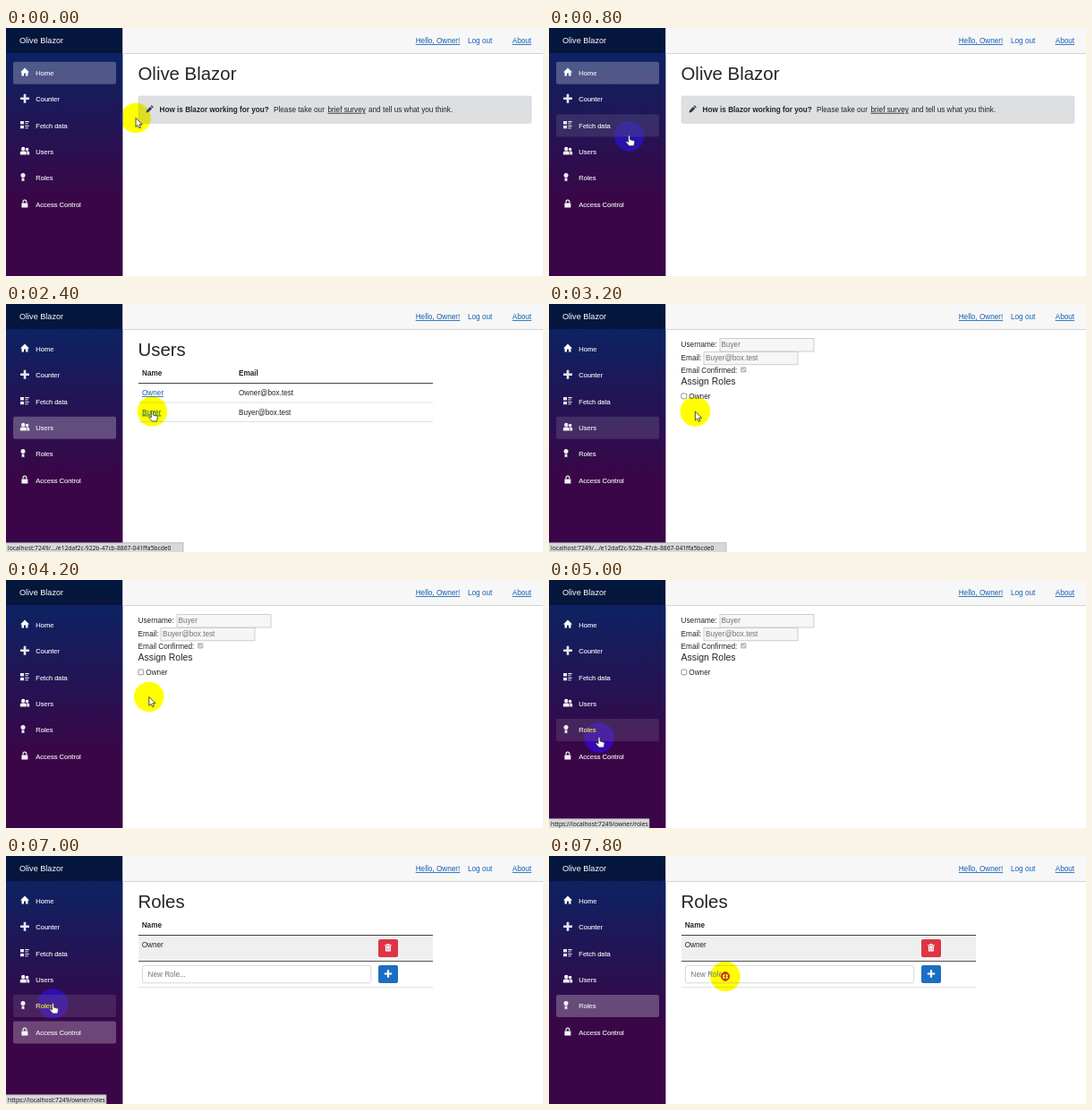
An HTML page for the animation above (8 s loop, 600x277 px).

```html
<!DOCTYPE html>
<html lang="en">
<head>
<meta charset="utf-8">
<title>Olive Blazor</title>
<style>
  html, body { margin: 0; width: 100%; height: 100%; overflow: hidden; background: #fff; }
  svg { display: block; width: 100%; height: 100%; }
  text { font: 8.2px "Liberation Sans", Arial, sans-serif; fill: #212529; white-space: pre; }
  .b { font-weight: bold; }
  .h1 { font-size: 20.4px; }
  .h2 { font-size: 10.45px; }
  .nav { font-size: 7.5px; fill: #eeeef3; stroke: #eeeef3; stroke-width: .15px; }
  .brand { font-size: 9.1px; fill: #fff; }
  .link { fill: #1261b5; }
  .u { text-decoration: underline; }
  .gray { fill: #6c757d; }
  .white { fill: #fff; }
  #status text { font: 6.75px "Open Sans", "Noto Sans", sans-serif; fill: #111; }
  #halo { fill: #00f; mix-blend-mode: difference; }
</style>
</head>
<body>
<svg id="stage" viewBox="0 0 600 277"></svg>
<script>
const LOOP = 8000, TICK = 200;
const HOST = 'https://localhost:7249/owner/';

const text = (x, y, s, cls = '') => `<text x="${x}" y="${y}" class="${cls}">${s}</text>`;
const rect = (x, y, w, h, fill, more = '') =>
  `<rect x="${x}" y="${y}" width="${w}" height="${h}" fill="${fill}" ${more}/>`;
const line = (x1, x2, y, color) => rect(x1, y, x2 - x1, 1, color);
const path = (d, fill, more = '') => `<path d="${d}" fill="${fill}" ${more}/>`;
const group = (id, body) => `<g id="${id}">${body}</g>`;
const plus = (x, y, r) =>
  path(`M${x - r} ${y}h${2 * r}M${x} ${y - r}v${2 * r}`, 'none', 'stroke="#fff" stroke-width="2.2"');

function checkbox(x, y, checked, fill = '#6f6f6f') {
  return checked
    ? rect(x, y, 6.4, 6.4, fill, 'rx="1"') +
      path(`M${x + 1.4} ${y + 3.2}l1.4 1.5l2.4 -3`, 'none', 'stroke="#fff" stroke-width="1"')
    : rect(x + .4, y + .4, 5.8, 5.8, '#fff', 'rx="1" stroke="#767676" stroke-width=".8"');
}

// Icons are centred on 0,0
const icons = [
  path('M0 -5L-5 0h1.5v4h2.5v-3h2v3h2.5v-4h1.5z', '#fff'),
  path('M-1.3 -5h2.6v3.7h3.7v2.6h-3.7v3.7h-2.6v-3.7h-3.7v-2.6h3.7z', '#e8e8ee'),
  path('M-5 -4h4v3.4h-4zM-5 .8h4v3.4h-4zM.3 -4h4.4v1.2h-4.4zM.3 -1.7h3.4v1.1h-3.4zM.3 .8h4.4v1.2h-4.4zM.3 3.1h3.4v1.1h-3.4z', '#e8e8ee'),
  '<g fill="#f2f2f6"><circle cx="-1.8" cy="-2.4" r="2.2"/><circle cx="2.6" cy="-2" r="1.8"/>' +
    '<path d="M-5.2 4v-2q0 -2 2 -2h3q2 0 2 2v2zM2.4 4v-2.5l-.6 -1.5h1.6q1.8 0 1.8 2v2z"/></g>',
  '<g fill="#f2f2f6"><circle cx="-2" cy="-2.3" r="2.5"/><path d="M-3.4 .8h2.8v4l-1.4 -1l-1.4 1z"/></g>',
  path('M-3.6 -.6h7v5h-7z', '#f2f2f6') +
    path('M-2 -.6v-1.6a1.9 1.9 0 0 1 3.8 0v1.6', 'none', 'stroke="#f2f2f6" stroke-width="1.2"'),
];
const navNames = ['Home', 'Counter', 'Fetch data', 'Users', 'Roles', 'Access Control'];
const navY = i => 50.2 + 29.35 * i;

const sidebar =
  rect(0, 0, 130.4, 277, 'url(#side)') + rect(0, 0, 130.4, 28, '#000', 'opacity=".4"') +
  text(15, 17.3, 'Olive Blazor', 'brand') +
  navNames.map((name, i) =>
    rect(8, navY(i) - 12.5, 115, 25, '#fff', `rx="2" class="item" opacity="0"`) +
    `<g transform="translate(21 ${navY(i) - .8})">${icons[i]}</g>` +
    text(33.3, navY(i) + 2.8, name, 'nav')).join('');

const topbar = rect(130.4, 0, 469.6, 28, '#f7f7f7') + line(130.4, 600, 28, '#d6d5d5') +
  group('account', text(457.7, 17, 'Hello, Owner!', 'link u') +
    text(516, 17, 'Log out', 'link') + text(565.7, 17, 'About', 'link u'));

const home = text(147.5, 57.5, 'Olive Blazor', 'h1') +
  rect(148, 76, 439, 30.5, '#dddfe1', 'rx="2" stroke="#d0d3d6" stroke-width=".6"') +
  path('M156.500 94.500l.6 -2.600l4 -4l2.100 2.100l-4 4zM161.700 87.300l1 -1l2.100 2.100l-1 1z', '#333a40') +
  text(171.5, 93.8, 'How is Blazor working for you?', 'b') +
  text(299, 93.8, 'Please take our') + text(359.5, 93.8, 'brief survey', 'u') +
  text(405, 93.8, 'and tell us what you think.');

const users = text(147.5, 57.5, 'Users', 'h1') +
  text(152, 80, 'Name', 'b') + text(260, 80, 'Email', 'b') + line(148, 477, 88, '#444') +
  ['Owner', 'Buyer'].map((name, i) =>
    text(152, 102 + 21.5 * i, name, 'link u') +
    text(260, 102 + 21.5 * i, name + '@box.test') +
    line(148, 477, 109.5 + 21.5 * i, '#dee2e6')).join('');

const field = (x, y) => rect(x, y, 105, 14.4, '#f6f6f6', 'stroke="#c4c4c4" stroke-width=".8"');
const detail = text(147.6, 48.3, 'Username:') + field(191, 38.6) + text(192.5, 48.3, 'Buyer', 'gray') +
  text(147.6, 63, 'Email:') + field(173, 53.4) + text(175, 63, 'Buyer@box.test', 'gray') +
  text(147.6, 76.8, 'Email Confirmed:') + checkbox(214, 70.2, true, '#bdbdbd') +
  text(147.6, 90.2, 'Assign Roles', 'h2') + checkbox(147.5, 99.6, false) + text(156.3, 106, 'Owner');

const permissions = ['None', 'ViewUsers', 'ManageUsers', 'ViewRoles', 'AddRoles', 'ManageSecurity',
  'ManagePermissions', 'AssignRoles', 'Demo'];
const access = text(151.7, 51, 'Permissions / Roles', 'b') + text(461, 51, 'Owner', 'b') +
  permissions.map((name, i) => {
    const y = 72.8 + 21.5 * i;
    return text(151.7, y, name) + checkbox(461.6, y - 6.6, true) + line(148, 578, y + 7.7, '#d6d8da');
  }).join('') +
  line(148, 578, 59, '#333') + line(148, 578, 252.5, '#333') +
  rect(152, 258, 32, 21, '#1b6ec2', 'rx="2"') + text(158.5, 271, 'Save', 'white') +
  rect(591, 0, 9, 277, '#fafafa') + rect(593.3, 13, 5, 241, '#8b8b8b', 'rx="2.5"') +
  path('M593 8.500l2.800 -4.500l2.800 4.500zM593 269.500l2.800 4.500l2.800 -4.500z', '#777');

const roles = text(147.5, 57.5, 'Roles', 'h1') + text(151.7, 80, 'Name', 'b') +
  rect(148, 89, 329, 28, '#f0eff0') + line(148, 477, 88, '#444') + line(148, 477, 117, '#555') +
  text(151.7, 102, 'Owner') + line(148, 477, 146, '#dee2e6') +
  rect(416, 93, 22, 20, '#dc3545', 'rx="2"') +
  path('M423.200 99.200h7.500v1.200h-7.500zM425.400 98h3v1h-3zM423.900 101h6v5.500h-6z', '#fff') +
  path('M425.700 102v3.500M428.200 102v3.500', 'none', 'stroke="#dc3545" stroke-width=".7"') +
  rect(152.4, 122.4, 255.4, 19.4, '#fff', 'rx="2" stroke="#ced4da" stroke-width=".9"') +
  text(158.5, 135, 'New Role...', 'gray') +
  rect(416, 122, 22, 20, '#1b6ec2', 'rx="2"') + plus(427, 131.5, 4.2);

const pages = { home, users, detail, access, roles };
const outline = 'stroke-width=".8" stroke-linejoin="round"';
const cursors = {
  arrow: path('M0 0v10l2.300 -2.100l1.600 3.400l1.700 -.8l-1.600 -3.300h3.200z', '#fff', `stroke="#222" ${outline}`),
  hand: path('M-1 0q1 -1.200 2 0v4l4.200 1.200q1 .4 .8 1.600l-.8 4.200h-5.400l-3.600 -4.300q.4 -1.400 1.600 -.7l1.200 .9z',
    '#fff', `stroke="#333" ${outline}`),
  beam: path('M-1.600 -4.500h3.200M0 -4.500v9M-1.600 4.500h3.200', 'none', 'stroke="#222" stroke-width=".9"'),
};

const stage = document.getElementById('stage');
stage.innerHTML =
  `<defs><linearGradient id="side" x1="0" y1="0" x2="0" y2="1">
     <stop offset="0" stop-color="#052767"/><stop offset=".7" stop-color="#3a0647"/></linearGradient></defs>` +
  rect(0, 0, 600, 277, '#fff') + sidebar + topbar +
  Object.entries(pages).map(([id, body]) => group(id, body)).join('') +
  group('status', rect(-1, 266.8, 10, 12, '#d8d8d8', 'stroke="#a8a8a8" stroke-width=".7"') + text(2, 274.7, '')) +
  '<circle id="halo" r="16.8"/>' +
  group('pointer', Object.entries(cursors).map(([id, body]) => group(id, body)).join('') +
    '<circle id="press" r="4" fill="none" stroke="#e8112d" stroke-width="1.8"/>');

// Timelines: each entry holds from its time on
const pageSteps = [[0, 'home'], [1800, 'users'], [2800, 'detail'], [5400, 'access'], [7000, 'roles']];
const activeSteps = [[0, 0, .26], [1800, 3, .26], [3200, 3, .12], [3400, -1, 0], [5400, 5, .26], [7200, 4, .26]];
const statusSteps = [[0, '', 0], [1800, HOST + 'users', 115], [2200, '', 0],
  [2400, 'localhost:7249/.../e12daf2c-922b-47cb-8867-041ffa5bcde0', 199], [3400, '', 0],
  [4800, HOST + 'roles', 113], [5200, HOST + 'permissions', 134], [6200, '', 0],
  [6800, HOST + 'roles', 113], [7600, '', 0]];
const clicks = [1600, 2600, 5200, 6800, 7800];
const track = [[0, 145, 100.5], [200, 145, 100.5], [1300, 47.5, 136], [1700, 47.5, 136],
  [2400, 163.4, 120], [3200, 163.4, 120], [3700, 179, 122], [4000, 179, 122], [4800, 56, 176],
  [5000, 56, 176], [5200, 57, 196], [5300, 57, 196], [5800, 299, 169], [6200, 299, 169],
  [6800, 52.5, 165], [7200, 52.5, 165], [7800, 197, 134.5], [8000, 197, 134.5]];

const $ = id => document.getElementById(id);
const at = (steps, t) => steps.findLast(s => s[0] <= t);
const show = (id, on) => $(id).setAttribute('display', on ? 'inline' : 'none');
const items = [...document.querySelectorAll('.item')];

function position(t) {
  const i = track.findLastIndex(k => k[0] <= t);
  const [t0, x0, y0] = track[i], [t1, x1, y1] = track[i + 1];
  const p = (t - t0) / (t1 - t0), e = p * p * (3 - 2 * p);
  return [x0 + (x1 - x0) * e, y0 + (y1 - y0) * e];
}

function pickCursor(page, hovered, x, y) {
  if (hovered >= 0 || page === 'users' && x > 150 && x < 176 && y > 114 && y < 126) return 'hand';
  return page === 'roles' && x > 152 && x < 408 && y > 122 && y < 142 ? 'beam' : 'arrow';
}

function draw(t) {
  const page = at(pageSteps, t)[1];
  const [, active, shade] = at(activeSteps, t);
  const [, label, width] = at(statusSteps, t);
  const [x, y] = position(t);
  const hovered = items.findIndex((_, i) => x > 8 && x < 123 && Math.abs(y - navY(i)) < 12.5);
  const cursor = pickCursor(page, hovered, x, y);

  for (const id in pages) show(id, id === page);
  for (const id in cursors) show(id, id === cursor);
  items.forEach((item, i) => item.setAttribute('opacity', i === active ? shade : i === hovered ? .1 : 0));
  $('account').setAttribute('transform', `translate(${page === 'access' ? -8.7 : 0} 0)`);

  show('status', label);
  $('status').firstChild.setAttribute('width', width);
  $('status').lastChild.textContent = label;

  const move = `translate(${x} ${y})`;
  $('halo').setAttribute('transform', move);
  $('pointer').setAttribute('transform', move);
  show('press', clicks.includes(t));
}

function frame() {
  draw(Math.floor(performance.now() % LOOP / TICK) * TICK);
  requestAnimationFrame(frame);
}
frame();
</script>
</body>
</html>
```
